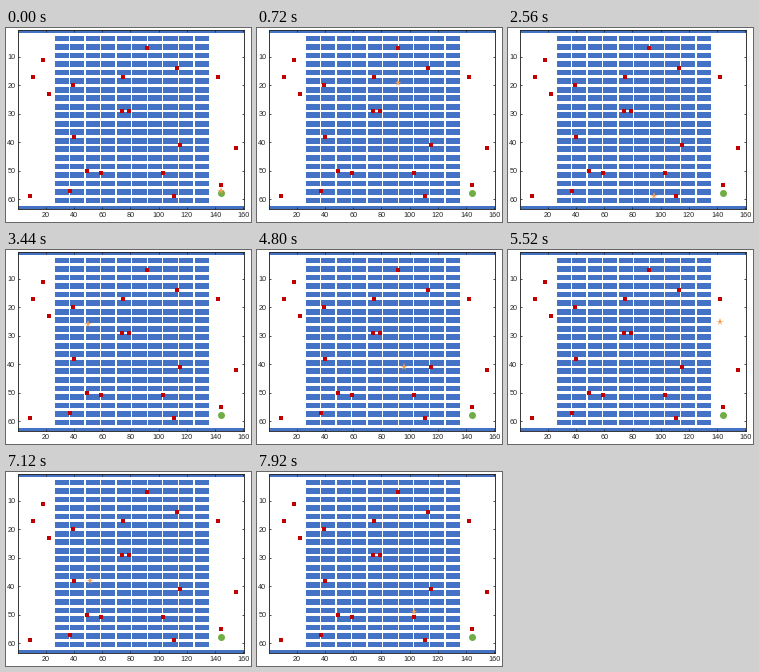
A matplotlib script for the animation above (8 s loop, 245 by 194 pixels).

```python
from itertools import groupby

import matplotlib.pyplot as plt
import numpy as np
from matplotlib.animation import FuncAnimation
from matplotlib.colors import ListedColormap

WIDTH, HEIGHT = 245, 194
FRAMES, INTERVAL = 100, 80
CELLS_PER_FRAME = 10
ROWS, COLS = 63, 160
PX = 0.72  # points per pixel at 100 dpi

BLUE, RED, GREEN, ORANGE = "#4472c4", "#c00000", "#70ad47", "#f4a050"
DARK = "#262626"

DEPOT = (144, 58)
PICKS = [
    (18, 11), (11, 17), (22, 23), (39, 20), (40, 38), (92, 7), (75, 17),
    (113, 14), (142, 17), (74, 29), (79, 29), (115, 41), (155, 42), (49, 50),
    (59, 51), (103, 51), (37, 57), (111, 59), (9, 59), (144, 55),
]
# Stops of the picker; a repeated stop is a one-step pause.
TOUR = [
    (144, 57), (92, 7), (18, 11), (18, 17), (11, 17), (11, 17), (24, 30),
    (37, 57), (111, 59), (79, 29), (50, 26), (39, 20), (18, 11), (18, 17),
    (11, 17), (11, 17), (40, 38), (96, 41), (155, 42), (142, 17), (75, 17),
    (11, 17), (40, 38), (111, 59), (103, 51), (103, 51), (103, 45),
]


def build_floor():
    """Racks of 2 x 10 cells with one-cell aisles, walls above and below."""
    y, x = np.mgrid[1:ROWS + 1, 1:COLS + 1]
    racks = ((y >= 3) & (y <= 61) & (y % 3 != 2)
             & (x >= 27) & (x <= 135) & ((x - 27) % 11 < 10))
    return racks | (y == 1) | (y == ROWS)


FLOOR = build_floor()


def neighbours(cell):
    """Free cells next to this one, sideways moves first."""
    x, y = cell
    for nx, ny in ((x - 1, y), (x + 1, y), (x, y - 1), (x, y + 1)):
        if 1 <= nx <= COLS and not FLOOR[ny - 1, nx - 1]:
            yield nx, ny


def shortest_path(start, goal):
    """Breadth-first search from the goal, then walk downhill from the start."""
    distance, queue = {goal: 0}, [goal]
    for cell in queue:
        if cell == start:
            break
        for near in neighbours(cell):
            if near not in distance:
                distance[near] = distance[cell] + 1
                queue.append(near)
    path, cell = [], start
    while cell != goal:
        cell = next(near for near in neighbours(cell)
                    if distance.get(near) == distance[cell] - 1)
        path.append(cell)
    return path or [goal]


ROUTE = [TOUR[0]]
for leg in zip(TOUR, TOUR[1:]):
    ROUTE += shortest_path(*leg)

fig = plt.figure(figsize=(WIDTH / 100, HEIGHT / 100), dpi=100, facecolor="white")
left, right, top, bottom = 12.4, 238, 2, 181
ax = fig.add_axes([left / WIDTH, 1 - bottom / HEIGHT,
                   (right - left) / WIDTH, (bottom - top) / HEIGHT])
ax.imshow(FLOOR, cmap=ListedColormap(["white", BLUE]), aspect="auto",
          interpolation="nearest",
          extent=(0.5, COLS + 0.5, ROWS + 0.5, 0.5))
ax.set_xticks(range(20, COLS + 1, 20))
ax.set_yticks(range(10, ROWS, 10))
ax.tick_params(direction="in", top=True, right=True, length=2.2 * PX,
               width=0.8 * PX, pad=3 * PX, color=DARK, labelcolor=DARK,
               labelsize=7.3 * PX, labelfontfamily="Liberation Sans")
for spine in ax.spines.values():
    spine.set(linewidth=0.9 * PX, color=DARK)


def dots(points, marker, size, color, zorder):
    xs, ys = zip(*points)
    return ax.plot(xs, ys, linestyle="none", marker=marker, color=color,
                   markersize=size * PX, markeredgewidth=0, zorder=zorder)[0]


dots(PICKS, "s", 4.6, RED, 3)
dots([DEPOT], "o", 7, GREEN, 4)
picker = dots([ROUTE[0]], "*", 7.4, ORANGE, 5)
ax.set_xlim(0.5, COLS + 0.5)
ax.set_ylim(ROWS + 0.5, 0.5)


def update(frame):
    x, y = ROUTE[frame * CELLS_PER_FRAME]
    picker.set_data([x], [y])
    return [picker]


anim = FuncAnimation(fig, update, frames=FRAMES, interval=INTERVAL,
                     repeat=True, repeat_delay=0)
plt.show()
```
